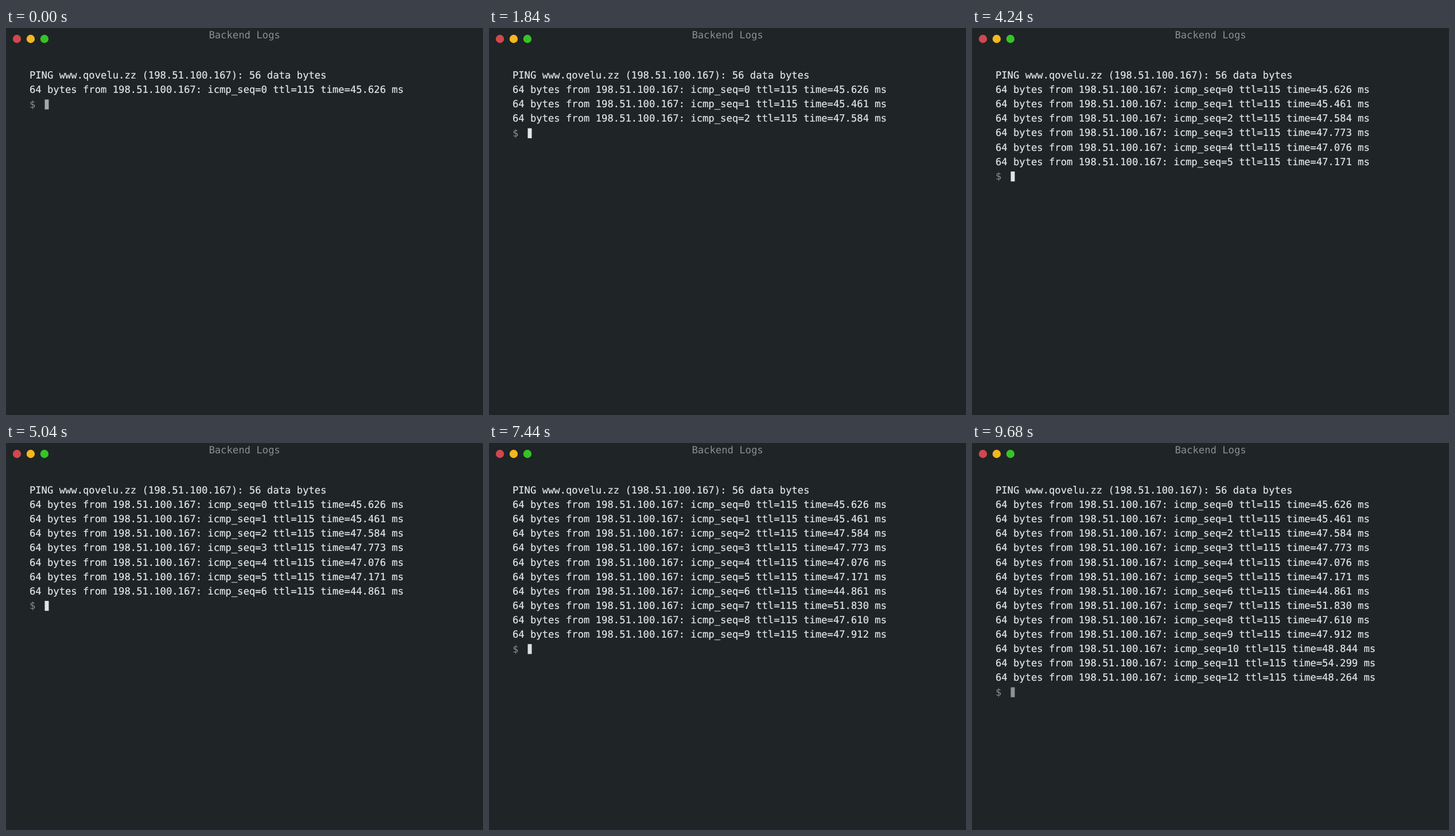
Write an HTML page that moves like this. It is 831 by 674 pixels and loops after 9760 ms.

```html
<!DOCTYPE html>
<html lang="en">
<head>
<meta charset="utf-8">
<title>Backend Logs</title>
<style>
  html, body { margin: 0; width: 100%; height: 100%; overflow: hidden; background: #1f2427; }
  svg { display: block; width: 831px; height: 674px; }
  text {
    font: 17.2px "DejaVu Sans Mono", monospace;
    fill: #e4e6e6;
    white-space: pre;
    text-rendering: geometricPrecision;
  }
  #log text { stroke: #e4e6e6; stroke-width: .2px; }
  .dim { fill: #8b8f90; }
</style>
</head>
<body>
<svg viewBox="0 0 831 674">
  <rect width="831" height="674" fill="#1f2427"/>
  <circle cx="19" cy="19" r="7.17" fill="#d2474f"/>
  <circle cx="42.95" cy="19" r="7.17" fill="#f4b71d"/>
  <circle cx="66.9" cy="19" r="7.17" fill="#35c426"/>
  <text class="dim" x="415.5" y="18" text-anchor="middle">Backend Logs</text>
  <g id="log"></g>
  <g id="prompt">
    <text class="dim" x="40.9" y="139">$</text>
    <rect id="cursor" x="67.5" y="124.5" width="7" height="17.3" fill="#e4e6e6"/>
  </g>
</svg>
<script>
  const LOOP = 9760, STEP = 80;
  const FIRST = 244, PERIOD = 809; // first new reply, time between replies
  const ROW = 25.08;
  const HOST = "www.qovelu.zz", IP = "198.51.100.167";
  const TIMES = ["45.626", "45.461", "47.584", "47.773", "47.076", "47.171", "44.861",
    "51.830", "47.610", "47.912", "48.844", "54.299", "48.264"];

  const log = document.getElementById("log");
  const prompt = document.getElementById("prompt");
  const cursor = document.getElementById("cursor");

  function addLine(str, row) {
    const el = document.createElementNS("http://www.w3.org/2000/svg", "text");
    el.setAttribute("x", 40.9);
    el.setAttribute("y", 88.1 + row * ROW);
    el.textContent = str;
    return log.appendChild(el);
  }

  addLine(`PING ${HOST} (${IP}): 56 data bytes`, 0);
  const replies = TIMES.map((ms, i) =>
    addLine(`64 bytes from ${IP}: icmp_seq=${i} ttl=115 time=${ms} ms`, i + 1));

  // CSS "ease": cubic-bezier(.25, .1, .25, 1)
  function ease(x) {
    const bez = (a, b, s) => 3 * a * s * (1 - s) ** 2 + 3 * b * s * s * (1 - s) + s ** 3;
    let lo = 0, hi = 1;
    for (let i = 0; i < 20; i++) {
      const mid = (lo + hi) / 2;
      if (bez(0.25, 0.25, mid) < x) lo = mid; else hi = mid;
    }
    return bez(0.1, 1, lo);
  }

  function blink(phase) {
    return phase < 0.5 ? 1 - ease(phase * 2) : ease(phase * 2 - 1);
  }

  function draw(now) {
    const t = Math.floor((now % LOOP) / STEP) * STEP;
    const beat = (t - FIRST) / PERIOD;
    const last = Math.min(Math.floor(beat) + 1, TIMES.length - 1);
    replies.forEach((el, i) => el.setAttribute("visibility", i <= last ? "visible" : "hidden"));
    prompt.setAttribute("transform", `translate(0 ${last * ROW})`);
    cursor.setAttribute("opacity", blink(beat - Math.floor(beat)));
  }

  const start = performance.now();
  function tick() {
    draw(performance.now() - start);
    requestAnimationFrame(tick);
  }
  tick();
</script>
</body>
</html>
```
